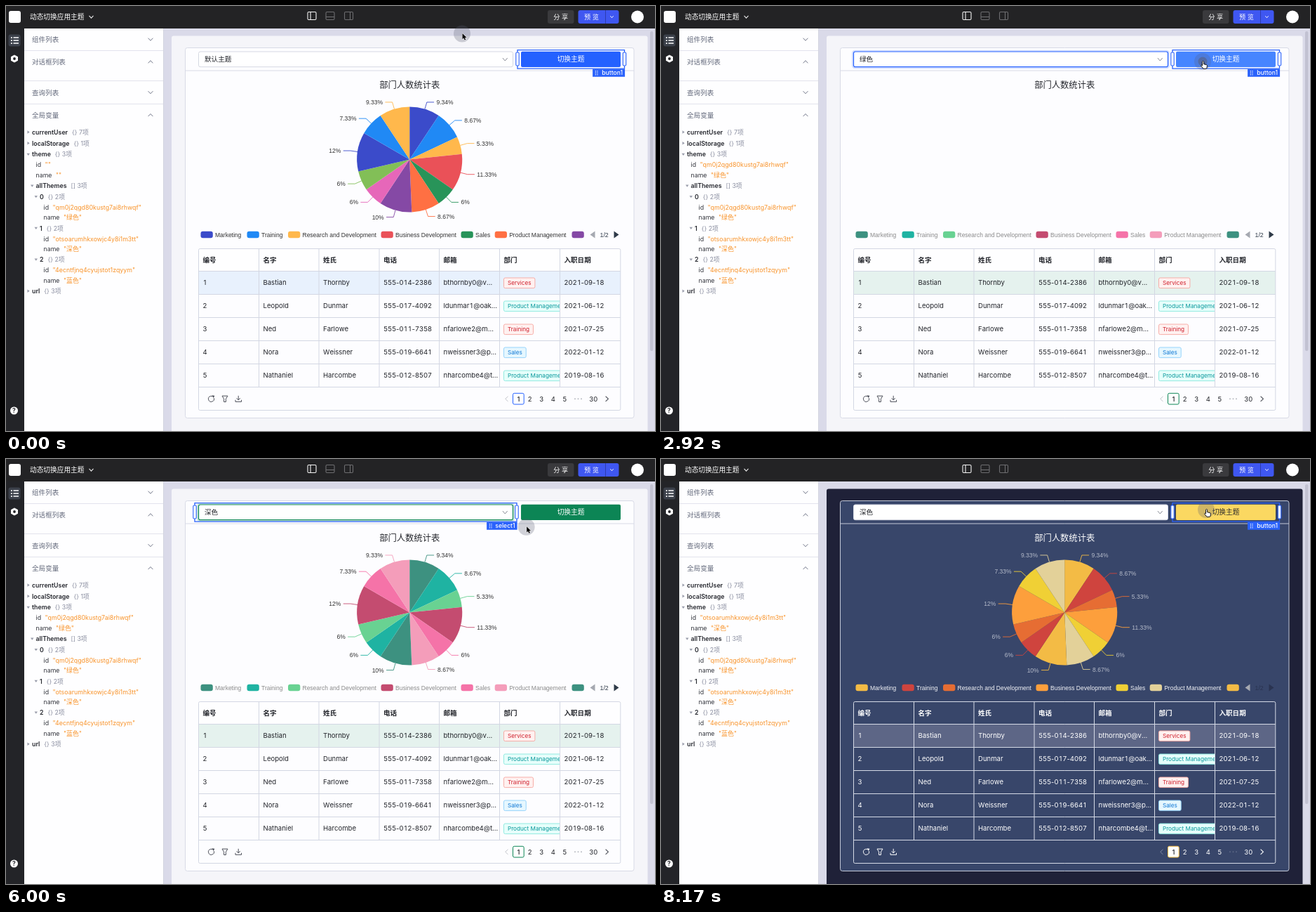
An HTML page with a canvas for the animation above (8330 ms loop, 925 px wide and 605 px high).

```html
<!DOCTYPE html>
<html lang="zh">
<head>
<meta charset="utf-8">
<title>动态切换应用主题</title>
<style>
html, body { margin: 0; width: 100%; height: 100%; overflow: hidden; background: #dadae9; }
canvas { display: block; width: 925px; height: 605px; }
</style>
</head>
<body>
<canvas id="stage"></canvas>
<script>
const W = 925, H = 605, LOOP = 8330;
const UI = 'Inter, "Noto Sans CJK SC", "Noto Sans CJK", sans-serif';
const CHART = '"Liberation Sans", Arial, sans-serif';
const BLUE = '#2a62fb';
const cv = document.getElementById('stage'), c = cv.getContext('2d');
const dpr = window.devicePixelRatio || 1;
cv.width = W * dpr;
cv.height = H * dpr;

const themes = [
  { name: '', id: '', page: '#f5f5f9', box: '#fdfdff', edge: '#d8dae6', line: '#d3d7e3', head: '#fefeff',
    row: '#e8f1fd', ink: '#23252b', label: '#333', legend: '#333', main: '#2461ff', hover: '#4785ff', pager: '#2f3a48',
    pal: ['#3b4bca', '#2089f5', '#ffb84c', '#ea5158', '#289459', '#ff7043', '#8549a5', '#e667b9', '#82bf57'] },
  { name: '绿色', id: 'qm0j2qgd80kustg7ai8rhwqf', page: '#f5f5f9', box: '#fdfdff', edge: '#d8dae6', line: '#d3d7e3',
    head: '#fefeff', row: '#e5f2ee', ink: '#23252b', label: '#333', legend: '#8a8a8a', main: '#0c8555', hover: '#22955b',
    pager: '#2f3a48', pal: ['#3d9180', '#1fb3a2', '#69d292', '#c44c70', '#f573a8', '#f49dba'] },
  { name: '深色', id: 'otsoarumhkxowjc4y8i1m3tt', page: '#1f2138', box: '#38466a', edge: '#c3c9d8', line: '#d5dae6',
    head: '#38466a', row: '#5d6686', ink: '#ffffff', label: '#b4bac9', legend: '#f3f4f8', main: '#f3bb45', hover: '#fbd861',
    pager: '#2a3350', pal: ['#f3bb45', '#cf443e', '#e66d33', '#fd9f3c', '#f0d035', '#e3d199'] }
];
const names = ['默认主题', '绿色', '深色', '蓝色'];
const ids = [themes[1].id, themes[2].id, '4ecntfjnq4cyujstot1zqyym'];
const shares = [9.34, 8.67, 5.33, 11.33, 6, 8.67, 10, 6, 6, 12, 7.33, 9.33];
const cols = [274.5, 360.5, 446, 532, 617.5, 703.5, 789.5, 875.8];
const rows = [
  ['Bastian', 'Thornby', '555-014-2386', 'bthornby0@v...', 'Services', '2021-09-18'],
  ['Leopold', 'Dunmar', '555-017-4092', 'ldunmar1@oak...', 'Product Management', '2021-06-12'],
  ['Ned', 'Farlowe', '555-011-7358', 'nfarlowe2@m...', 'Training', '2021-07-25'],
  ['Nora', 'Weissner', '555-019-6641', 'nweissner3@p...', 'Sales', '2022-01-12'],
  ['Nathaniel', 'Harcombe', '555-012-8507', 'nharcombe4@t...', 'Product Management', '2019-08-16']
];
const red = ['#fff1f0', '#f7a5a0', '#cf1f2c'], cyan = ['#e6fffb', '#87e8de', '#08979c'];
const tags = { Services: red, Training: red, Sales: ['#e6f7ff', '#8dd0fb', '#0f78d4'], 'Product Management': cyan };
const legend = [[277.5, 'Marketing'], [343.5, 'Training'], [402, 'Research and Development'],
  [534.5, 'Business Development'], [648.5, 'Sales'], [696.7, 'Product Management'], [806.5, '']];

// pointer stops: time, x, y
const path = [[0, 650, 39.5], [500, 650, 39.5], [670, 652, 26], [920, 660, 75], [1050, 660, 76], [1500, 631.5, 126],
  [2080, 631.5, 126], [2670, 718, 85], [2750, 765, 80], [2920, 772, 79], [3100, 772, 79], [3750, 694, 77],
  [3920, 688, 77], [4600, 688, 77], [5170, 661, 154], [5560, 661, 154], [6250, 776, 72.5], [6420, 777, 72], [LOOP, 777, 72]];

const clamp = v => Math.max(0, Math.min(1, v));
const within = (t, a, b) => t >= a && t < b;
const inOut = p => p < .5 ? 4 * p ** 3 : 1 - (2 - 2 * p) ** 3 / 2;
const fade = (t, a, b) => clamp((t - a) / 170) * (1 - clamp((t - b) / 170));

function mix(a, b, p) {
  const ch = (s, i) => parseInt(s.slice(i, i + 2), 16);
  return `rgb(${[1, 3, 5].map(i => Math.round(ch(a, i) + (ch(b, i) - ch(a, i)) * p))})`;
}
function pointer(t) {
  let i = 1;
  while (i < path.length - 1 && path[i][0] < t) i++;
  const a = path[i - 1], b = path[i];
  let p = clamp((t - a[0]) / (b[0] - a[0]));
  p = p * p * (3 - 2 * p);
  return { x: a[1] + (b[1] - a[1]) * p, y: a[2] + (b[2] - a[2]) * p };
}
function rect(x, y, w, h, fill, r = 0, stroke, lw = 1) {
  c.beginPath();
  c.roundRect(x, y, w, h, r);
  if (fill) { c.fillStyle = fill; c.fill(); }
  if (stroke) { c.strokeStyle = stroke; c.lineWidth = lw; c.stroke(); }
}
function disc(x, y, r, fill) {
  c.beginPath();
  c.arc(x, y, r, 0, 7);
  c.fillStyle = fill;
  c.fill();
}
function line(pts, color, lw = 1) {
  c.beginPath();
  for (let i = 0; i < pts.length; i += 2) c.lineTo(pts[i], pts[i + 1]);
  c.strokeStyle = color;
  c.lineWidth = lw;
  c.stroke();
}
function poly(pts, fill) {
  c.beginPath();
  for (let i = 0; i < pts.length; i += 2) c.lineTo(pts[i], pts[i + 1]);
  c.fillStyle = fill;
  c.fill();
}
function text(s, x, y, size, color, weight = 400, align = 'left', font = UI) {
  c.font = `${weight} ${size}px ${font}`;
  c.textAlign = align;
  c.fillStyle = color;
  c.fillText(s, x, y + size * .365);
}
// tabular figures
function figures(s, x, y, size, color) {
  c.font = `400 ${size}px ${UI}`;
  const w0 = c.measureText('0').width;
  for (const ch of s) {
    const digit = ch >= '0' && ch <= '9', w = digit ? w0 : c.measureText(ch).width;
    text(ch, x + w / 2, y, size, color, 400, 'center');
    x += w;
  }
}
const chevron = (x, y, w, h, color, lw) => line([x - w, y - h, x, y + h, x + w, y - h], color, lw);

function panelIcon(x, color, side) {
  rect(x - 6, 8.5, 12, 11, null, 1.5, color, 1.1);
  if (side === 'bottom') line([x - 6, 15.5, x + 6, 15.5], color, 1.1);
  else {
    const lx = x + (side === 'left' ? -2 : 2);
    line([lx, 8.5, lx, 19.5], color, 1.1);
  }
}
function topBar() {
  rect(0, 0, W, 32, '#232325');
  rect(0, 32, 26, H, '#232428');
  rect(4, 7, 17, 17, '#fff', 3);
  text(names.length && '动态切换应用主题', 34, 15.5, 9.7, '#fff', 500);
  chevron(121.5, 15.5, 3, 1.6, '#e8e8e8', 1.1);
  panelIcon(436, '#f4f4f4', 'left');
  panelIcon(462, '#6d6d70', 'bottom');
  panelIcon(488.5, '#6d6d70', 'right');
  rect(772, 6, 37.5, 19, '#3a3a3d', 3);
  text('分 享', 790.8, 15.5, 9.2, '#fff', 400, 'center');
  rect(815.5, 6, 58, 19, '#3f57f1', 3);
  text('预 览', 834.5, 15.5, 9.2, '#fff', 400, 'center');
  line([854.5, 6, 854.5, 25], '#2c3cae', 1);
  chevron(863.5, 15.5, 2.2, 1.2, '#fff', 1);
  disc(900, 15.5, 9, '#fff');

  rect(3.5, 40.5, 17, 17, '#3c414b', 3);
  for (const y of [45, 49, 53]) {
    rect(7, y - .8, 1.8, 1.8, '#fff');
    line([10.5, y, 18, y], '#fff', 1.5);
  }
  poly([12, 69.5, 17, 72.2, 17, 77.8, 12, 80.5, 7, 77.8, 7, 72.2], '#fff');
  disc(12, 75, 1.9, '#232428');
  disc(11.5, 576, 5.5, '#fff');
  text('?', 11.5, 576, 8.5, '#232428', 700, 'center');
}
function node(x, y, key, kind, open) {
  if (open) poly([x - 7.5, y - 1.5, x - 3, y - 1.5, x - 5.2, y + 1.7], '#9a9dab');
  else poly([x - 6.5, y - 2.2, x - 3.3, y, x - 6.5, y + 2.2], '#9a9dab');
  text(key, x, y, 8.8, '#25272e', 600);
  const w = c.measureText(key).width;
  text(kind, x + w + 6, y, 8.8, '#8a8ea0');
}
function leaf(x, y, key, value) {
  text(key, x, y, 8.8, '#33353d');
  text(`"${value}"`, x + c.measureText(key).width + 5.5, y, 8.85, '#f8932a');
}
function sidebar(th) {
  rect(26, 32, 198, H, '#fefeff');
  line([224.5, 32, 224.5, H], '#d3d4e0');
  [['组件列表', 47.5, 1], ['对话框列表', 79.5, -1], ['查询列表', 123, 1], ['全局变量', 155.3, -1]].forEach(([s, y, d]) => {
    text(s, 37, y, 9.6, '#646a7c', 500);
    chevron(206, y, 3.4, 1.8 * d, '#72778a', 1);
  });
  for (const y of [63.5, 106.5, 139.5]) line([26, y, 224, y], '#e2e3ed');
  node(37, 179.5, 'currentUser', '{} 7项');
  node(37, 195.3, 'localStorage', '{} 1项');
  node(37, 211.2, 'theme', '{} 3项', true);
  leaf(42.5, 226, 'id', th.id);
  leaf(42.5, 240.5, 'name', th.name);
  node(42.5, 256, 'allThemes', '[] 3项', true);
  ids.forEach((id, i) => {
    const y = 271.5 + i * 44.8;
    node(48, y, String(i), '{} 2项', true);
    leaf(53.5, y + 15, 'id', id);
    leaf(53.5, y + 29.5, 'name', names[i + 1]);
  });
  node(37, 405.8, 'url', '{} 3项');
}
function pie(th, p) {
  const cx = 575.2, cy = 218.5, r = 75, k = inOut(p);
  let sum = 0;
  shares.forEach((v, i) => {
    const col = th.pal[i % th.pal.length], turn = Math.PI / 50;
    const a = sum * turn, b = (sum + v) * turn, m = (a + b) / 2;
    sum += v;
    c.beginPath();
    c.moveTo(cx, cy);
    c.arc(cx, cy, r, a * k - Math.PI / 2, b * k - Math.PI / 2);
    c.fillStyle = col;
    c.fill();
    const s = Math.sin(m), q = -Math.cos(m), d = s > 0 ? 1 : -1;
    const x = cx + s * (r + 10.2), y = cy + q * (r + 10.2);
    c.globalAlpha = k;
    line([cx + s * r, cy + q * r, x, y, x + d * 10.2, y], col, .9);
    text(v + '%', x + d * 13.6, y, 8.5, th.label, 400, d > 0 ? 'left' : 'right', CHART);
    c.globalAlpha = 1;
  });
}
function chart(th, p) {
  text('部门人数统计表', 575.2, 113, 12.3, th.ink, 500, 'center');
  if (p > 0) pie(th, p);
  legend.forEach(([x, s], i) => {
    rect(x, 320.7, 17.3, 9.6, th.pal[i % th.pal.length], 3);
    text(s, x + 20.5, 325.5, 8.5, th.legend, 400, 'left', CHART);
  });
  poly([832.5, 325.5, 839.5, 320.5, 839.5, 330.5], '#a6a9b1');
  text('1/2', 846.5, 325.5, 8.8, th.pager, 400, 'left', CHART);
  poly([873.5, 325.5, 866.5, 320.5, 866.5, 330.5], th.pager);
}
function footer(th, dark) {
  const ink = dark ? '#fff' : '#4a4d57', y = 559.3;
  c.beginPath();
  c.arc(292.5, y, 4, -.3, 5.2);
  c.strokeStyle = ink;
  c.lineWidth = 1;
  c.stroke();
  poly([293.5, y - 5, 297.3, y - 4.6, 295.8, y - 1.2], ink);
  line([308, y - 4.2, 316, y - 4.2, 313.4, y, 313.4, y + 4.2, 310.6, y + 4.2, 310.6, y, 308, y - 4.2], ink, 1);
  line([331.2, y - 4.5, 331.2, y + 1.5], ink, 1);
  line([328.7, y - 1, 331.2, y + 1.6, 333.7, y - 1], ink, 1);
  line([327, y + 1.5, 327, y + 4, 335.5, y + 4, 335.5, y + 1.5], ink, 1);
  line([715.5, y - 3.6, 711.7, y, 715.5, y + 3.6], dark ? '#7c86a0' : '#c3c5cc', 1);
  rect(722.5, 551.3, 15.7, 15.7, '#fff', 2, th.main);
  text('1', 730.4, y, 9.5, '#23252b', 500, 'center');
  [746.7, 763.2, 779.8, 796.2].forEach((x, i) => text(String(i + 2), x, y, 9.5, th.ink, 400, 'center'));
  for (const x of [811, 815.5, 820]) disc(x, y, 1, dark ? '#5c6886' : '#b8bac2');
  text('30', 837.2, y, 9.5, th.ink, 400, 'center');
  line([854.6, y - 3.6, 858.4, y, 854.6, y + 3.6], dark ? '#fff' : '#4a4d57', 1.1);
}
function table(th, headBg, dark) {
  rect(274.5, 345.5, 601.3, 32, headBg);
  rect(274.5, 377.5, 601.3, 33, th.row);
  ['编号', '名字', '姓氏', '电话', '邮箱', '部门', '入职日期'].forEach((s, i) =>
    text(s, cols[i] + 6, 361.7, 9.56, th.ink, 600));
  rows.forEach((row, r) => {
    const y = 394 + 33 * r;
    figures(String(r + 1), cols[0] + 6, y, 9.56, th.ink);
    row.forEach((s, i) => {
      const x = cols[i + 1] + 6;
      if (i !== 4) return figures(s, x, y, 9.56, th.ink);
      const [bg, edge, ink] = tags[s];
      c.save();
      c.beginPath();
      c.rect(cols[5], y - 16, cols[6] - cols[5], 32);
      c.clip();
      c.font = `400 8.2px ${UI}`;
      rect(x, y - 7, c.measureText(s).width + 10.8, 14.6, bg, 2, edge, .9);
      text(s, x + 5.4, y + .4, 8.2, ink);
      c.restore();
    });
  });
  for (let y = 377.5; y < 545; y += 33) line([274.5, y, 875.8, y], th.line);
  for (const x of cols.slice(1, 7)) line([x, 345.5, x, 542.5], th.line);
  rect(274.5, 345.5, 601.3, 230, null, 2, th.line);
  footer(th, dark);
}
function outline(x, y, w, h, name, tagW, handles) {
  rect(x, y, w, h, null, 0, BLUE, 1.3);
  if (handles) for (const hx of [x, x + w]) rect(hx - 2.2, 66, 4.4, 19, '#fff', 1.5, BLUE, 1.1);
  const right = x + w + .6, ty = y + h + .5;
  rect(right - tagW, ty, tagW, 11, BLUE);
  for (let i = 0; i < 6; i++) disc(right - tagW + 4.3 + i % 2 * 2.6, ty + 3 + (i >> 1) * 2.5, .7, '#fff');
  text(name, right - 3, ty + 5.6, 8.6, '#fff', 500, 'right');
}
function select(th, value, s) {
  const lit = s.focus || s.overSelect;
  if (s.focus) rect(273, 63.7, 451, 24.6, null, 3.5, th.main + '33', 2);
  rect(274.5, 65, 448, 21.7, '#fff', 2.5, lit ? th.main : '#d5d8e2', lit ? 1.2 : 1);
  text(value, 283, 75.8, 9.6, s.drop > 0 ? '#a6a8ae' : '#23252b');
  if (s.open) {
    c.beginPath();
    c.arc(710.5, 75, 2.6, 0, 7);
    c.strokeStyle = '#9a9ca5';
    c.lineWidth = 1;
    c.stroke();
    line([712.4, 77, 714.8, 79.3], '#9a9ca5', 1);
  } else chevron(711.3, 76, 3.4, 2, '#888b95', 1);
}
function dropdown(s, value) {
  c.save();
  c.globalAlpha = s.drop;
  c.shadowColor = 'rgba(0,0,0,.2)';
  c.shadowBlur = 14 * dpr;
  c.shadowOffsetY = 3 * dpr;
  rect(274, 90, 449, 98, '#fff', 2);
  c.shadowColor = 'transparent';
  names.forEach((n, i) => {
    const y = 95 + 22 * i;
    if (s.option === i) rect(279, y, 439, 22, '#f2f6fd');
    text(n, 285, y + 11, 9.6, '#23252b', n === value ? 700 : 400);
  });
  c.restore();
}
const hand = new Path2D('M0 0c.8 0 1.1.5 1.1 1.2v3l3.6.8c.9.2 1.3.7 1.2 1.6l-.4 3c0 .6-.4 1.2-1 1.2H.6L-2.7 7c-.5-.8.3-1.6 1.1-1.1l.6.5V1.2C-1 .5-.7 0 0 0Z');
const arrow = new Path2D('M0 0V8.2L1.9 6.5L3.2 9.4L4.7 8.7L3.4 5.9H6Z');

function drawPointer(m, s) {
  disc(m.x, m.y, 12, s.press ? 'rgba(90,92,110,.24)' : 'rgba(90,92,110,.27)');
  if (s.press) disc(m.x, m.y, 6.5, 'rgba(90,92,110,.5)');
  c.save();
  c.translate(m.x + .5, m.y - .5);
  c.lineWidth = 1;
  if (s.overButton || s.option >= 0) {
    c.fillStyle = '#fff';
    c.strokeStyle = '#111';
    c.fill(hand);
    c.stroke(hand);
  } else if (s.overSelect) {
    line([-2.3, -4.5, 0, -3.6, 2.3, -4.5], '#222', 1);
    line([0, -3.6, 0, 4.6], '#222', 1.1);
    line([-2.3, 5.5, 0, 4.6, 2.3, 5.5], '#222', 1);
  } else {
    c.strokeStyle = '#fff';
    c.fillStyle = '#000';
    c.stroke(arrow);
    c.fill(arrow);
  }
  c.restore();
}

function draw(t) {
  const k = t >= 6400 ? 2 : t >= 2900 ? 1 : 0;
  const th = themes[k], old = themes[Math.max(0, k - 1)], since = t - [-9999, 2900, 6400][k];
  const blend = clamp((since - 20) / 300), dark = k === 2;
  const value = names[t >= 5450 ? 2 : t >= 1960 ? 1 : 0];
  const m = pointer(t);
  const inside = (x, y, w, h) => m.x >= x && m.x <= x + w && m.y >= y && m.y <= y + h;
  const s = {
    open: within(t, 1080, 1960) || within(t, 4520, 5450),
    drop: Math.max(fade(t, 1040, 2020), fade(t, 4480, 5470)),
    focus: within(t, 1000, 3000) || within(t, 4500, 6500),
    overSelect: inside(269, 63, 459, 26),
    overButton: inside(734, 63, 144, 26),
    press: [[1000, 1150], [1900, 2100], [2850, 3050], [4500, 4640], [5400, 5550], [6350, 6560]].some(p => within(t, ...p))
  };
  s.option = s.open && inside(279, 95, 439, 88) ? Math.floor((m.y - 95) / 22) : -1;
  const picked = within(t, 1000, 2850) || within(t, 4500, 6350) ? 'select' : 'button';
  const overChart = (within(t, 1960, 2750) || within(t, 5450, 6400)) && m.y > 100;
  const shade = s.overButton || within(t, 2850, 4500) || t >= 6350 ? 'hover' : 'main';

  c.setTransform(dpr, 0, 0, dpr, 0, 0);
  rect(225, 32, 700, H, '#dadae9');
  rect(236, 42.5, 678.5, H, th.page, [3, 3, 0, 0]);
  rect(918, 36, 4.5, 455, '#c2c2d2', 2);
  rect(255.5, 59.5, 639.5, 527, th.box, 3, th.edge);
  line([255.5, 92, 895, 92], th.edge);
  topBar();
  sidebar(th);
  chart(th, clamp((since - (k === 1 ? 20 : 0)) / 1000));
  table(th, dark ? mix('#f6f7fb', th.head, blend) : th.head, dark);
  select(since < 60 ? old : th, value, s);
  rect(734, 64.7, 142, 22.2, mix(old[shade], th[shade], blend), 2);
  text('切换主题', 805, 75.8, 9.7, dark && blend > .5 ? '#2b2b2b' : '#fff', 400, 'center');

  if (overChart) outline(269.5, 100.7, 612, 235.5, 'chart1', 40.5, false);
  if (picked === 'select' || s.overSelect) outline(269, 62.7, 459, 26.5, 'select1', 43.5, picked === 'select');
  if (picked === 'button' || s.overButton) outline(729, 62.7, 152.5, 26.5, 'button1', 46, picked === 'button');
  if (s.drop > 0) dropdown(s, value);
  drawPointer(m, s);
}

const snap = t => Math.floor(t / 250) * 250 + (t % 250 >= 170 ? 170 : 0);
let start;
function tick(now) {
  if (start === undefined) start = now;
  draw(snap((now - start) % LOOP));
  requestAnimationFrame(tick);
}
draw(0);
requestAnimationFrame(tick);
</script>
</body>
</html>
```
